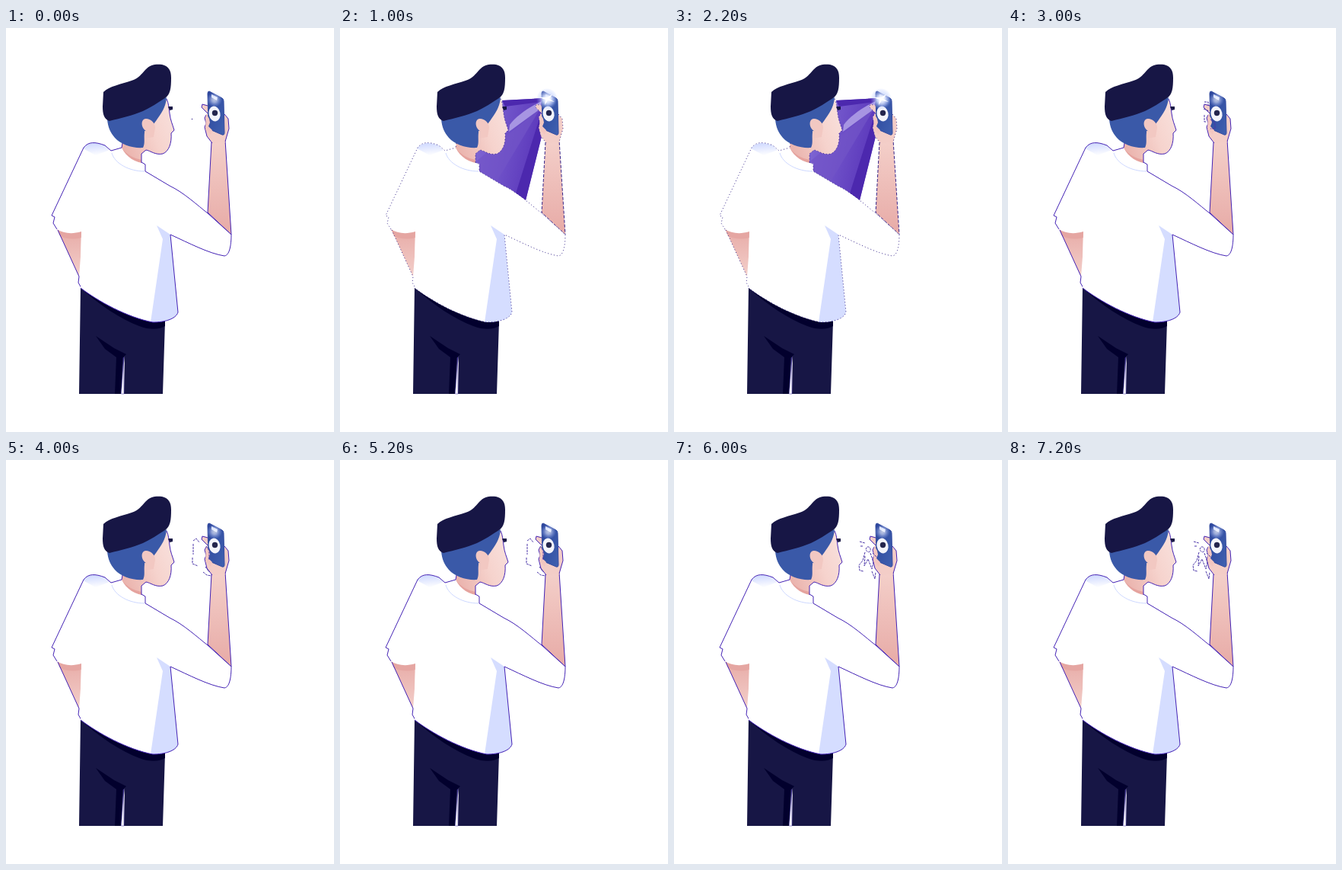
Write an HTML page that moves like this. It is 431 by 530 pixels and loops after 8 s.

```html
<!DOCTYPE html>
<html lang="en">
<head>
<meta charset="utf-8">
<title>Man with a phone</title>
<style>
html, body { margin: 0; width: 100%; height: 100%; overflow: hidden; background: #fff }
svg { display: block; width: 431px; height: 530px }
.line { fill: none; stroke: #4322b5; stroke-width: 1; stroke-linejoin: round }
.lit .line { stroke-dasharray: 1 3; stroke: #35248a }
.lit .arm { stroke-dasharray: 4 2 }
.marks path { fill: none; stroke: #4a35a8; stroke-width: 1; stroke-dasharray: 3 1 }
</style>
</head>
<body>
<svg id="stage" viewBox="0 0 431 530">
  <defs>
    <linearGradient id="skin" x1="0" x2="1" y1=".8" y2=".3">
      <stop stop-color="#e9b0aa"/><stop offset=".6" stop-color="#f6d3cd"/><stop offset="1" stop-color="#f8dfdb"/>
    </linearGradient>
    <linearGradient id="limb" x1="0" x2="0" y1="0" y2="1">
      <stop stop-color="#f4d0ca"/><stop offset="1" stop-color="#e7aaa6"/>
    </linearGradient>
    <linearGradient id="elbow" x1="0" x2="0" y1="0" y2="1">
      <stop stop-color="#e7aaa6"/><stop offset="1" stop-color="#f3cfca"/>
    </linearGradient>
    <linearGradient id="shoulder" x1=".4" x2=".6" y1="0" y2="1">
      <stop stop-color="#cfd9ff"/><stop offset="1" stop-color="#fff"/>
    </linearGradient>
    <linearGradient id="beam" x1="0" x2="1" y1=".3" y2=".6">
      <stop stop-color="#8068d4"/><stop offset="1" stop-color="#5732b8"/>
    </linearGradient>
    <linearGradient id="case" x1="0" x2="1" y1="0" y2="1">
      <stop stop-color="#2b459b"/><stop offset="1" stop-color="#4061b0"/>
    </linearGradient>
    <radialGradient id="glow">
      <stop stop-color="#fff"/><stop offset=".35" stop-color="#e3eaff" stop-opacity=".85"/><stop offset="1" stop-color="#9db5ff" stop-opacity="0"/>
    </radialGradient>
  </defs>

  <g id="light">
    <path fill="url(#beam)" d="M213 95 268 92 266 138 244 226 178 188V162L216 140Z"/>
    <path fill="#4c28ae" d="M213 95 268 92 264 97 217 103ZM266 106V138L244 226 231 217Z"/>
    <path fill="#7355c8" opacity=".7" d="M264 104 238 148 205 203 180 187V174Z"/>
    <path fill="#a795e2" d="M265 96C248 104 231 116 223 127L222 136 262 107Z"/>
  </g>

  <!-- trousers -->
  <path fill="#171645" d="M98 340C128 358 163 380 209 385L206 480H155L156 430 151 480H96Z"/>
  <path fill="#02002d" d="M98 341C122 363 151 382 175 391 190 397 203 395 209 391V384L180 380ZM118 404 142 420 158 428 153 433 151 480H143L145 432 130 421Z"/>
  <path fill="#fff" stroke="#4030a5" stroke-width=".5" d="M154.500 432 155 480H151.500Z"/>

  <!-- bent arm -->
  <path fill="url(#elbow)" d="M67 263 99 265 98 300 96 326Z"/>
  <path fill="#e5a6a2" d="M67 263H99V275C88 278 77 276 71 273Z"/>
  <path class="line" d="M68 265 96 326 95 334 99 341"/>

  <!-- raised arm and hand -->
  <path fill="url(#limb)" d="M270 149 265 242 296 271 288 146Z"/>
  <path class="line arm" d="M270 150 265 242 296 271 288 147"/>
  <path fill="#f3cdc7" d="M265 101 258 100 257 104 265 112 261 117 263 125 261 130 264 142 271 151 288 150 293 132 292 119 286 112Z"/>
  <path class="line" d="M265 102 258 100 257 104 265 112M263 114 261 118 263 125 261 130 264 142 271 151M287 113 292 119 293 132 288 149"/>

  <!-- phone -->
  <path fill="url(#case)" stroke="#344ca0" d="M267 83 284 92Q286 93 286 96L287 137Q287 141 284 140L270 134Q266 132 266 129L265 86Q265 83 267 83Z"/>
  <path fill="#f2c6c0" d="M263 112 267 119 268 124 266 129 271 134 269 140 262 133Z"/>
  <ellipse cx="274" cy="112.500" rx="7.500" ry="10" fill="#f3f4fb" transform="rotate(-12 274 112.500)"/>
  <circle cx="274.500" cy="111.500" r="3.700" fill="#24254d"/>
  <path fill="#e9eeff" d="M270 87 278 91 277 95 270 91Z"/>
  <circle cx="274" cy="94" r="10" fill="url(#glow)" opacity=".7"/>
  <g id="flash">
    <circle cx="272" cy="93" r="14" fill="url(#glow)"/>
    <path fill="#fff" d="M262 91 272 91 279 87 275 93 282 97 273 95 269 101 270 94Z"/>
  </g>

  <!-- neck, face, hair, hat -->
  <path fill="url(#skin)" d="M211 92C214 99 214 106 215 112 216 121 219 127 221 134L217 138C218 151 214 162 206 165 196 167 190 161 184 160L178 165V179C166 179 156 173 151 163L153 150 178 123Z"/>
  <path fill="#e5a39e" d="M152 157C158 166 168 171 178 173V179C164 178 154 171 151 163Z"/>
  <path class="line" d="M211 93C214 99 214 106 215 112 216 121 219 127 221 134L217 138C218 151 214 162 206 165 196 167 190 161 184 160L178 165V177M153 151 152 157"/>
  <path fill="#3a59a8" d="M133 120 211 91C210 104 204 112 197 122L190 131 182 137C181 145 183 151 180 157 167 158 151 153 143 144 137 137 134 130 133 120Z"/>
  <path fill="#f2c8c2" d="M193 136C188 137 183 136 180 131 177 125 179 119 184 119 190 119 196 124 196 131L194 143 182 145V135Z"/>
  <path fill="#171645" d="M128 84C136 76 151 74 165 69 175 66 178 60 183 55 189 48 197 47 205 48 214 50 217 56 217 65 217 79 216 87 209 92 199 98 191 104 180 109 166 115 151 118 136 122 129 120 127 113 127 103Z"/>
  <path fill="#171645" d="M213 103H219V107L215 108Z"/>

  <!-- shirt -->
  <path fill="#fff" d="M60 246 102 157C108 149 117 149 130 154L138 161 152 157C158 170 170 176 183 178V188L215 207C234 216 252 233 265 243L296 271C296 280 295 298 287 299 267 296 240 282 216 271L226 373C223 382 208 386 193 386 160 380 120 358 98 341L99 267C86 271 75 269 67 264L62 256Z"/>
  <path fill="url(#shoulder)" d="M101 158C107 150 117 149 130 154L136 160 118 167Z"/>
  <path fill="#d5ddff" d="M198 259 216 271 226 373C223 382 211 386 190 386L206 277Z"/>
  <path fill="none" stroke="#cdd8ff" d="M139 164C143 178 162 188 182 188"/>
  <path class="line" d="M67 264 62 256 64 248 60 246 102 157C108 149 117 149 130 154L138 161 152 157M178 176 183 179V188L215 207C234 216 252 233 265 243L296 271C296 280 295 298 287 299 267 296 240 282 216 271L226 373C223 382 208 386 193 386 160 380 120 358 98 341"/>

  <circle class="marks" cx="244.500" cy="119.500" r=".7" fill="#35248a"/>
  <g class="marks">
    <path d="M258 97H263V101M257 106 264 109M258 114V123H261M266 120 272 124V132H266"/>
  </g>
  <g class="marks">
    <path d="M246 106 250 103 254 108M246 110V124M245 128V136L252 139M263 113 267 119V131M259 147 264 151 270 152M262 140 267 147"/>
  </g>
  <g class="marks">
    <path d="M244 107 251 109M245 113H249M254 114C258 113 260 119 256 121 252 120 251 116 254 114ZM251 121 248 132 243 138 244 145 249 146M251 126 250 139 255 130 260 143 262 134 258 122M261 122 267 128M260 146 264 156 265 147"/>
  </g>
</svg>
<script>
const stage = document.getElementById('stage');
const light = document.getElementById('light');
const flash = document.getElementById('flash');
const marks = stage.querySelectorAll('.marks');
const loop = 8000;
const cuts = [1000, 3000, 4000, 6000];
const markAt = [0, -1, 1, 2, 3];
const show = (el, on) => { el.style.display = on ? '' : 'none'; };

function draw(now) {
  const t = now % loop;
  const scene = cuts.filter(cut => t >= cut).length;
  const lit = scene === 1;
  stage.classList.toggle('lit', lit);
  show(light, lit);
  show(flash, lit);
  marks.forEach((el, i) => show(el, i === markAt[scene]));
}

let start;
function tick(now) {
  start ??= now;
  draw(now - start);
  requestAnimationFrame(tick);
}
draw(0);
requestAnimationFrame(tick);
</script>
</body>
</html>
```
